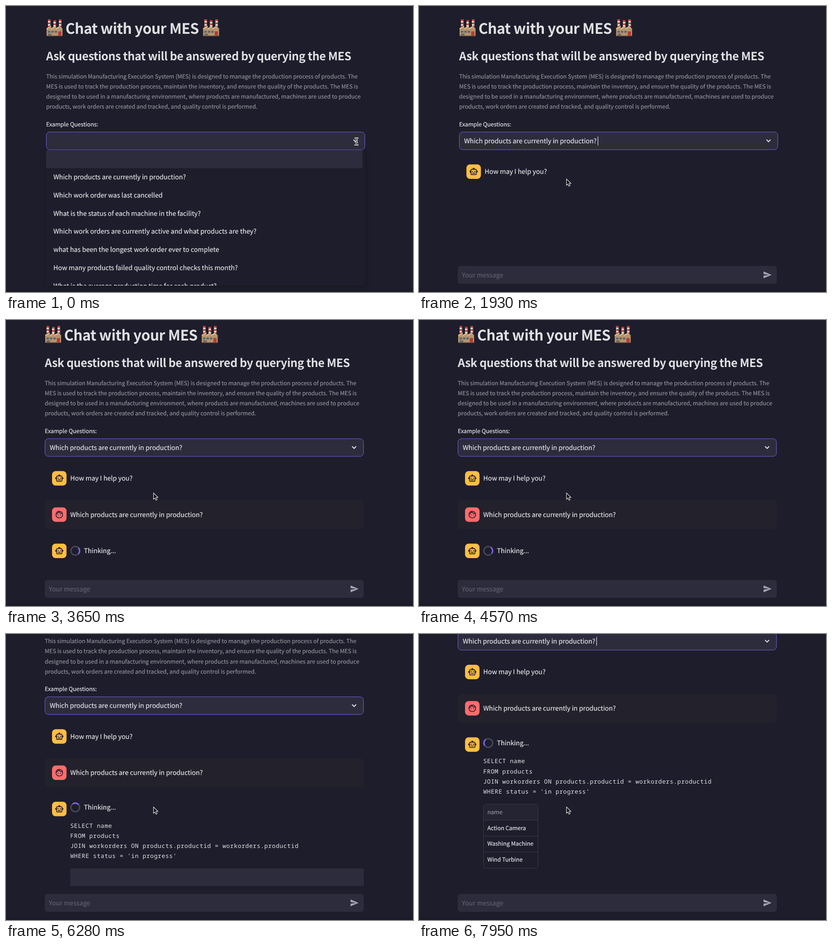
An HTML page for the animation above (8000 ms loop, 893 px wide and 627 px high).

```html
<!DOCTYPE html>
<html lang="en">
<head>
<meta charset="utf-8">
<title>Chat with your MES</title>
<style>
  html, body { margin: 0; width: 100%; height: 100%; overflow: hidden; background: #1e1d2b; }
  svg { display: block; width: 893px; height: 627px; }
  text {
    font: 14.24px "Noto Sans CJK JP", "Noto Sans CJK SC", "Noto Sans", sans-serif;
    color: #e3e3e8; fill: currentColor; stroke: currentColor; stroke-width: .22px;
    text-rendering: geometricPrecision; white-space: pre;
  }
  .h1, .h2 { font-weight: 700; letter-spacing: -.018em; color: #e0e0e4; stroke: none; }
  .h1 { font-size: 31.7px; }
  .h2 { font-size: 24.9px; }
  .small, .caption text { font-size: 12.46px; }
  .caption text { color: #8f8e98; }
  .hint { color: #686775; stroke: none; }
  .code text {
    font-family: "Noto Sans Mono", "DejaVu Sans Mono", monospace;
    font-size: 13px; letter-spacing: .55px; stroke: none;
  }
  .panel { fill: #2d2c3c; }
  .bg { fill: #1e1d2b; }
  #popover > .bg { filter: drop-shadow(0 3px 7px rgba(0, 0, 0, .22)); }
  .line { fill: none; stroke: #3b3a49; }
</style>
</head>
<body>
<svg viewBox="0 0 893 627">
  <defs>
    <clipPath id="listClip"><rect x="88" y="316" width="700" height="297"/></clipPath>

    <g id="chimney">
      <rect width="5.6" height="24" fill="#e9e2dc"/>
      <path d="M0 1.5h5.6M0 8.5h5.6M0 15.5h5.6" stroke="#c8392f" stroke-width="3.4"/>
      <path d="M4.8 0v24" stroke="#000" stroke-opacity=".18" stroke-width="1.6"/>
    </g>
    <g id="factory">
      <use href="#chimney" x="3"/>
      <use href="#chimney" x="15" y="2"/>
      <use href="#chimney" x="27"/>
      <path d="M0 36V19l10-5v5l10-5v5l10-5v5h5v17z" fill="#b5946c"/>
      <path d="M0 19l10-5v3L0 22zM10 19l10-5v3l-10 5zM20 19l10-5v3l-10 5z" fill="#d5b88f"/>
      <path d="M3 25h5v4H3zM10.500 25h5v4h-5zM18 25h5v4h-5z" fill="#4d6478"/>
      <path d="M3 31h8v5H3z" fill="#6d6a68"/>
      <path d="M25.500 26h7v10h-7z" fill="#b83a34"/>
      <path d="M0 36h35" stroke="#6f5b48" stroke-width="1.4"/>
    </g>

    <g id="bot">
      <rect width="31.800" height="31.800" rx="8" fill="#ffbd45"/>
      <g transform="translate(6.100 6) scale(.82)" fill="#1e1d2b">
        <rect x="5" y="6" width="14" height="14" rx="1" fill="none" stroke="#1e1d2b" stroke-width="2"/>
        <path d="M9 5a3 3 0 0 1 6 0zM4 9a3 3 0 0 0 0 6zM20 9a3 3 0 0 1 0 6zM8 15h8v2H8z"/>
        <circle cx="9" cy="11.500" r="1.500"/><circle cx="15" cy="11.500" r="1.500"/>
      </g>
    </g>
    <g id="person">
      <rect width="31.800" height="31.800" rx="8" fill="#ff6c6c"/>
      <g transform="translate(6.100 6.100) scale(.82)" fill="#1e1d2b">
        <g fill="none" stroke="#1e1d2b" stroke-width="2">
          <circle cx="12" cy="12" r="9"/>
          <path d="M3.500 10.600Q8.600 9 10.500 4.200Q14 9.600 20.300 8.800"/>
        </g>
        <circle cx="9" cy="13" r="1.250"/><circle cx="15" cy="13" r="1.250"/>
      </g>
    </g>
  </defs>

  <rect class="bg" width="893" height="627"/>

  <g id="page">
    <use href="#factory" x="89" y="29.500"/>
    <text class="h1" x="130.500" y="60.500">Chat with your MES</text>
    <use href="#factory" x="432.500" y="29.500"/>
    <text class="h2" x="88" y="119.300">Ask questions that will be answered by querying the MES</text>
    <g class="caption" id="caption"></g>
    <text class="small" x="88" y="263.700">Example Questions:</text>

    <rect x="88.500" y="276.200" width="698.800" height="38.800" rx="7.500" fill="#2d2c3c" stroke="#7661de"/>
    <text id="value" x="99" y="300.500">Which products are currently in production?</text>
    <path d="M762.300 293l4.500 4.500 4.500-4.500" fill="none" stroke="#e3e3e8" stroke-width="2"/>
    <rect id="caret" y="286" width="1.200" height="19.500" fill="#e3e3e8"/>

    <g id="hello">
      <use href="#bot" x="104" y="347.200"/>
      <text x="144" y="368.300">How may I help you?</text>
    </g>
    <g id="question">
      <rect x="88" y="411" width="700" height="63.500" rx="8" fill="#22212c"/>
      <use href="#person" x="104" y="426.700"/>
      <text x="144" y="447.500">Which products are currently in production?</text>
    </g>
    <use id="answer" href="#bot" x="104" y="506.200"/>
    <g id="thinking">
      <g fill="none" stroke-width="3">
        <circle cx="155" cy="522" r="9.500" stroke="#474657"/>
        <path id="arc" d="M148.280 515.280a9.500 9.500 0 0 1 13.440 0" stroke="#7a63ea"/>
      </g>
      <text x="174" y="527">Thinking...</text>
    </g>
    <g class="code" id="sql"></g>
    <rect id="skeleton" class="panel" x="144" y="652.500" width="644" height="60" rx="3"/>
    <g id="table">
      <path d="M144.500 688v-29a6 6 0 0 1 6-6h107.500a6 6 0 0 1 6 6v29z" fill="#252433"/>
      <rect class="line" x="144.500" y="653" width="119.500" height="140.500" rx="6"/>
      <path class="line" d="M144.500 688H264M144.500 723H264M144.500 757.500H264"/>
    </g>
  </g>

  <g id="bottom">
    <rect class="bg" y="552.700" width="893" height="75"/>
    <rect class="panel" x="85" y="569.700" width="700" height="39.300" rx="6"/>
    <text class="hint" x="94" y="594.700">Your message</text>
    <path transform="translate(754.300 579.400) scale(.84)" d="M2 21l21-9L2 3v7l15 2-15 2z" fill="#a5a4b3"/>
  </g>

  <g id="popover">
    <rect class="bg" x="88" y="316" width="700" height="297" rx="4"/>
    <rect id="highlight" class="panel" x="88" width="694" height="39.500"/>
    <g id="options" clip-path="url(#listClip)"></g>
    <rect id="scrollbar" x="782" y="317" width="6" height="84.500" rx="2" fill="#6b6a74"/>
  </g>

  <rect y="622" width="893" height="5" fill="#1b1a27"/>

  <g id="ibeam" fill="none" stroke-linecap="round">
    <path d="M-3-7.500Q0-7.500 0-5V5Q0 7.500-3 7.500M3-7.500Q0-7.500 0-5M3 7.500Q0 7.500 0 5M-2 1.500h4" stroke="#f2f2f4" stroke-width="3"/>
    <path d="M-3-7.500Q0-7.500 0-5V5Q0 7.500-3 7.500M3-7.500Q0-7.500 0-5M3 7.500Q0 7.500 0 5M-2 1.500h4" stroke="#15141d"/>
  </g>
  <g id="hand" stroke="#111018" stroke-width=".9" stroke-linejoin="round">
    <path d="M-3.800-6.500Q-2.200-8-1.200-6.200L0-2.400Q1.600-3.400 2.400-2Q4-2.800 4.500-1.200Q6.200-1.600 6.300 .6Q6.600 4 5 7H-1.500Q-3.500 3.500-6 1.200Q-6.300-.8-4.300-.3L-2.600 1.200Z" fill="#fff"/>
    <path d="M.8 2v3M2.600 2v3M4.300 2v3" fill="none"/>
  </g>
  <path id="arrow" d="M0 0V13.700L3.200 10.800 5.300 15.600 7.800 14.500 5.700 9.800 9.600 9.500Z" fill="#0c0b12" stroke="#f4f4f6" stroke-width="1.100"/>
</svg>

<script>
const LOOP = 8000, BLINK = 950, SPIN = 950, ROW = 39.75;
const $ = id => document.getElementById(id);
const show = (id, on) => { $(id).style.display = on ? "" : "none"; };
const place = (id, x, y) => $(id).setAttribute("transform", `translate(${x} ${y})`);

function addLines(id, x, y, step, lines) {
  lines.forEach((line, i) => {
    const node = document.createElementNS("http://www.w3.org/2000/svg", "text");
    node.setAttribute("x", x);
    node.setAttribute("y", y + i * step);
    node.textContent = line;
    $(id).append(node);
  });
}

addLines("caption", 88, 158.7, 22.2, [
  "This simulation Manufacturing Execution System (MES) is designed to manage the production process of products. The",
  "MES is used to track the production process, maintain the inventory, and ensure the quality of the products. The MES is",
  "designed to be used in a manufacturing environment, where products are manufactured, machines are used to produce",
  "products, work orders are created and tracked, and quality control is performed."
]);
addLines("options", 104, 380, ROW, [
  "Which products are currently in production?",
  "Which work order was last cancelled",
  "What is the status of each machine in the facility?",
  "Which work orders are currently active and what products are they?",
  "what has been the longest work order ever to complete",
  "How many products failed quality control checks this month?",
  "What is the average production time for each product?"
]);
addLines("sql", 144, 563.2, 22.2, [
  "SELECT name",
  "FROM products",
  "JOIN workorders ON products.productid = workorders.productid",
  "WHERE status = 'in progress'"
]);
addLines("table", 153, 674.8, 34.7, ["name", "Action Camera", "Washing Machine", "Wind Turbine"]);
document.querySelectorAll("#table text").forEach((node, i) => {
  node.classList.add("small");
  if (!i) node.style.color = "#93929d";
});

// Start times of each stage, in ms
const CLOSED = 1930, ASKED = 1990, REPLY = 2050, THINK = 2410, QUERY = 6230, RESULT = 6390;

// Pointer path: time, x, y
const path = [
  [210, 769, 297], [450, 750, 322], [700, 690, 356], [960, 576, 386],
  [1140, 391, 398.5], [1300, 329, 412], [1470, 329, 412], [1690, 327, 387]
];

function pointerAt(t) {
  if (t <= path[0][0]) return path[0].slice(1);
  const i = path.findIndex(p => p[0] > t);
  if (i < 0) return path[path.length - 1].slice(1);
  const [t0, x0, y0] = path[i - 1], [t1, x1, y1] = path[i];
  const k = (t - t0) / (t1 - t0);
  return [x0 + (x1 - x0) * k, y0 + (y1 - y0) * k];
}

function drawPointer(t) {
  const [x, y] = pointerAt(t);
  const open = t < CLOSED, inField = y < 318;
  show("ibeam", open && inField);
  show("hand", open && !inField);
  show("arrow", !open);
  place("ibeam", x, y);
  place("hand", x, y);
  place("arrow", 323.7, 379.3);

  const row = Math.max(0, Math.floor((y - 7 - 316) / ROW));
  $("highlight").setAttribute("y", 316 + row * ROW);
  show("popover", open);
  show("scrollbar", !inField);
}

function drawCaret(t) {
  const empty = t < CLOSED;
  const start = empty ? 210 : 1965;
  const on = empty
    ? t >= start && (t - start) % BLINK < BLINK / 2
    : t < start || (t - start) % BLINK < BLINK / 2;
  $("caret").setAttribute("x", empty ? 101 : 392);
  show("caret", on);
}

function draw(t) {
  const scroll = t < ASKED ? 0 : t < QUERY ? 16 : t < RESULT ? 138.5 : 279.8;
  place("page", t < ASKED ? 0 : -3, -scroll);
  show("value", t >= CLOSED);
  show("hello", t >= CLOSED);
  show("bottom", t >= CLOSED);
  show("question", t >= ASKED);
  show("answer", t >= REPLY);
  show("thinking", t >= THINK);
  show("sql", t >= QUERY);
  show("skeleton", t >= QUERY && t < RESULT);
  show("table", t >= RESULT);
  place("thinking", 0, t < QUERY ? 0 : -3.3);
  $("arc").setAttribute("transform", `rotate(${90 + (t - 3650) / SPIN * 360} 155 522)`);
  drawCaret(t);
  drawPointer(t);
}

const begin = performance.now();
function tick() {
  draw((performance.now() - begin) % LOOP);
  requestAnimationFrame(tick);
}
tick();
</script>
</body>
</html>
```
